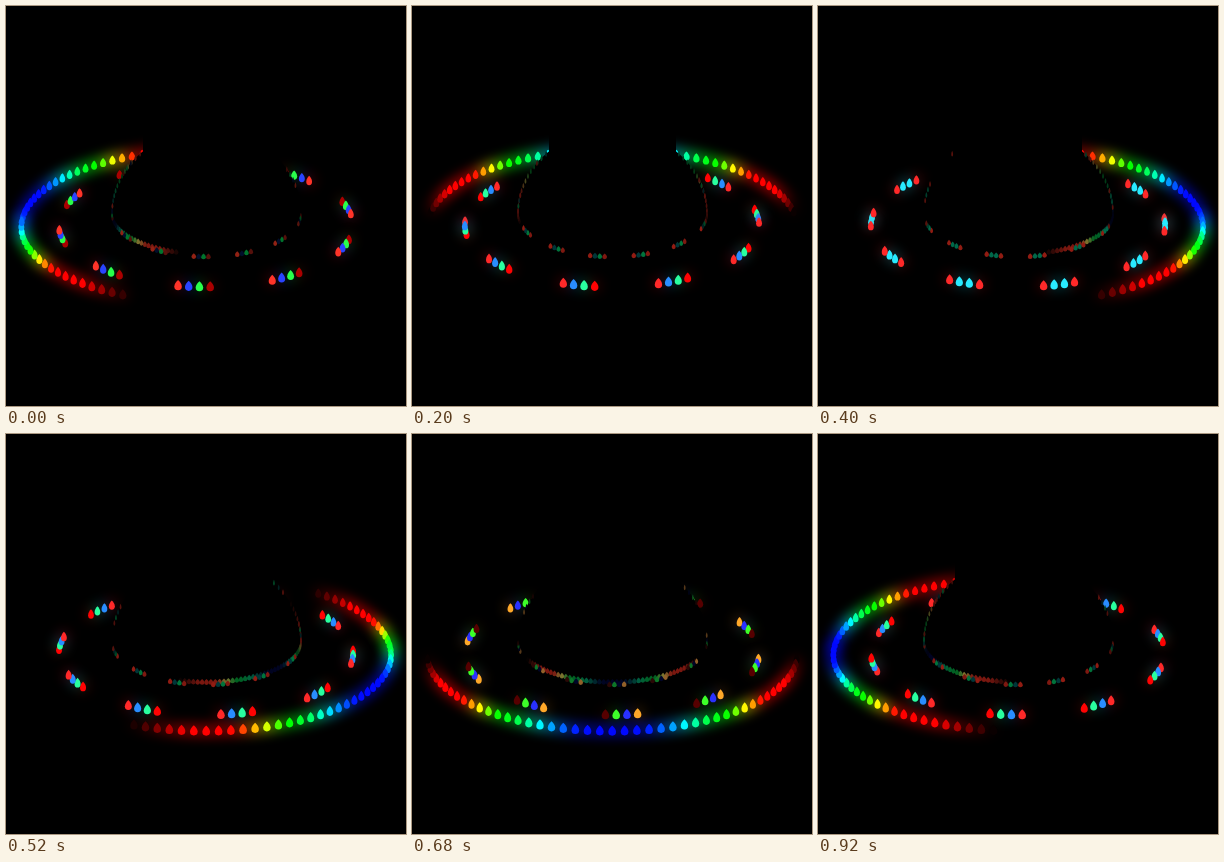
Recreate the animation shown at these times as an HTML page. Size 400 by 400 pixels, loop 0.96 s.

```html
<!DOCTYPE html>
<html lang="en">
<head>
<meta charset="utf-8">
<title>Light rings</title>
<style>
html, body { margin: 0; width: 100%; height: 100%; overflow: hidden; background: #000; }
svg { display: block; width: 100vw; height: 100vh; }
</style>
</head>
<body>
<svg viewBox="0 0 400 400">
  <defs>
    <filter id="soft" filterUnits="userSpaceOnUse" x="0" y="100" width="400" height="240" color-interpolation-filters="sRGB">
      <feGaussianBlur stdDeviation="5.5"/>
    </filter>
    <filter id="tint" filterUnits="userSpaceOnUse" x="90" y="120" width="220" height="150" color-interpolation-filters="sRGB">
      <feColorMatrix values=".95 0 0 0 0  .18 .75 0 0 0  .12 .25 .25 0 0  0 0 0 1 0"/>
      <feGaussianBlur stdDeviation=".5"/>
    </filter>
  </defs>
  <rect width="400" height="400"/>
  <g id="backGlow" filter="url(#soft)" opacity=".5"></g>
  <g id="back"></g>
  <path d="M137 90H264V146H137Z"/>
  <path d="M106 207.5A94.5 84 0 0 1 295 207.5A94.5 43 0 0 1 106 207.5Z"/>
  <g id="frontGlow" filter="url(#soft)" opacity=".5"></g>
  <g id="mirror" filter="url(#tint)"></g>
  <g id="front"></g>
</svg>
<script>
const LOOP = 960, STEP = 40;
const NS = 'http://www.w3.org/2000/svg';
const DROP = 'M0-4.8C1.5-3.6 3.6-1.2 3.6 1.2A3.6 3.6 0 0 1-3.6 1.2C-3.6-1.2-1.5-3.6 0-4.8Z';

// hue by distance from the centre of a light band
const HUES = [238, 238, 237, 232, 217, 202, 182, 158, 138, 126, 118, 94, 58, 37, 6, 0];

// angles run clockwise on screen, starting at the bottom
const RINGS = [
  { count: 100, rx: 184.5, ry: 76.2, cx: 200.2, cy: 215.1, depth: 0.064,
    shift: 0, start: 29.17, period: 100, spread: 1,
    light: 50, halo: 0.8, gloss: 0.5, sag: 40.5 },
  { count: 90, rx: 147, ry: 61.6, cx: 200, cy: 215.6, depth: 0.0475,
    shift: 0.61, start: 1.36, period: 9, spread: 11.6,
    light: 58, halo: 0.25, gloss: 0.6, sag: 43 }
];

const layer = id => document.getElementById(id);

function add(parent, tag, attrs) {
  const el = document.createElementNS(NS, tag);
  for (const key in attrs) el.setAttribute(key, attrs[key]);
  parent.appendChild(el);
  return el;
}

function addDrop(parent, x, y, sx, sy) {
  const place = `translate(${x.toFixed(2)} ${y.toFixed(2)}) scale(${sx.toFixed(3)} ${sy.toFixed(3)})`;
  return add(parent, 'path', { d: DROP, transform: place });
}

function addMirror(angle, sag) {
  const a = 0.74 * angle + 0.015 * angle ** 3;
  const c = Math.cos(a);
  const x = 200.5 - 94.5 * Math.sin(a);
  const y = 207.5 + (c > 0 ? sag : 84) * c;
  return addDrop(layer('mirror'), x, y, 0.25 + 0.4 * Math.max(0, c), 0.6);
}

function buildLamp(ring, i) {
  const pos = i + ring.shift;
  let angle = pos / ring.count * 2 * Math.PI;
  if (angle > Math.PI) angle -= 2 * Math.PI;
  const c = Math.cos(angle);
  const near = 1 / (1 - ring.depth * c);
  const x = ring.cx - ring.rx * Math.sin(angle) * near;
  const y = ring.cy + ring.ry * c * near;
  const side = c < 0 ? 'back' : 'front';
  const wide = Math.max(0.82, Math.sqrt(Math.abs(c)));
  const lamp = {
    ring, pos,
    body: addDrop(layer(side), x, y, wide * near, near),
    glow: add(layer(side + 'Glow'), 'circle', { cx: x, cy: y, r: 8, opacity: ring.halo })
  };
  if (Math.abs(angle) < 2.8) {
    lamp.mirror = addMirror(angle, ring.sag);
    lamp.gloss = ring.gloss * (Math.abs(angle) > 1.6 ? 0.6 : 1);
  }
  return lamp;
}

const lamps = RINGS.flatMap(ring =>
  Array.from({ length: ring.count }, (_, i) => buildLamp(ring, i)));

function hueAt(d) {
  const i = Math.floor(d);
  if (i >= HUES.length - 1) return 0;
  return HUES[i] + (HUES[i + 1] - HUES[i]) * (d - i);
}

function levelAt(d) {
  return Math.min(1, Math.max(0, (23.2 - d) / 5));
}

function paint(el, hue, level, light = 50) {
  if (!el) return;
  el.style.display = level > 0.02 ? '' : 'none';
  el.setAttribute('fill', `hsl(${hue.toFixed(1)} 100% ${(light * level).toFixed(1)}%)`);
}

function draw(time) {
  const t = Math.floor(time % LOOP / STEP) * STEP;
  for (const lamp of lamps) {
    const { period, start, spread, light } = lamp.ring;
    const gap = lamp.pos - start - period * t / LOOP;
    const d = Math.abs(gap - period * Math.round(gap / period)) * spread;
    const hue = hueAt(d), level = levelAt(d);
    paint(lamp.body, hue, level, light);
    paint(lamp.glow, hue, level);
    paint(lamp.mirror, hue, level * lamp.gloss);
  }
}

const begin = performance.now();
function tick() {
  draw(performance.now() - begin);
  requestAnimationFrame(tick);
}
tick();
</script>
</body>
</html>
```
